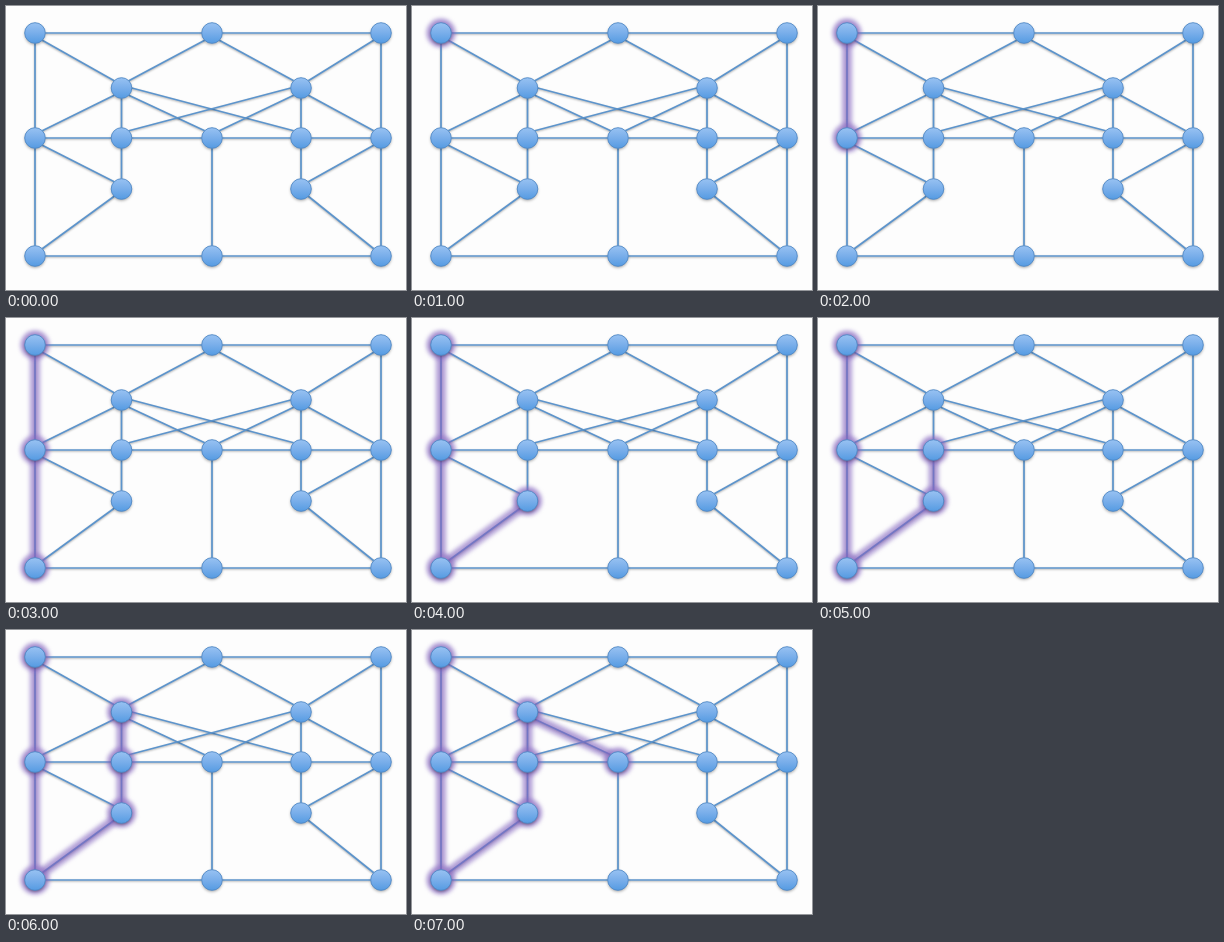
An HTML page with a canvas for the animation above (8000 ms loop, 400x284 px).

```html
<!DOCTYPE html>
<html lang="en">
<head>
<meta charset="utf-8">
<title>Graph path</title>
<style>
html, body { margin: 0; width: 100%; height: 100%; overflow: hidden; background: #fdfdfd; }
canvas { display: block; }
</style>
</head>
<body>
<canvas width="400" height="284"></canvas>
<script>
const ctx = document.querySelector('canvas').getContext('2d');
const RADIUS = 10.3, STEP = 1000, STEPS = 8;

const nodes = {
  A: [29, 27], B: [206, 27], C: [375, 27],
  D: [115.5, 82], E: [295, 82],
  F: [29, 132], G: [115.5, 132], H: [206, 132], I: [295, 132], J: [375, 132],
  K: [115.5, 183], L: [295, 183],
  M: [29, 250], N: [206, 250], O: [375, 250]
};
const edges = ('AB BC AF FM CJ JO MN NO AD DB BE EC DF DG DH DI EG EH EI EJ ' +
  'FG GH HI IJ FK GK KM IL LJ LO HN').split(' ');
const path = 'AFMKGDH';

// Edges attach to the rim of a node, at one of eight compass points.
function endpoints([from, to]) {
  const [x1, y1] = nodes[from], [x2, y2] = nodes[to];
  const sx = Math.sign(x2 - x1), sy = Math.sign(y2 - y1);
  const r = sx && sy ? RADIUS * Math.SQRT1_2 : RADIUS;
  const flat = Math.abs(x2 - x1) > 3 * Math.abs(y2 - y1) && sy;
  return [
    flat ? x1 + sx * RADIUS : x1 + sx * r, flat ? y1 : y1 + sy * r,
    x2 - sx * r, y2 - sy * r
  ];
}

function strokeEdge(edge) {
  const [x1, y1, x2, y2] = endpoints(edge);
  ctx.beginPath();
  ctx.moveTo(x1, y1);
  ctx.lineTo(x2, y2);
  ctx.stroke();
}

function circle([x, y], radius) {
  ctx.beginPath();
  ctx.arc(x, y, radius, 0, 2 * Math.PI);
}

function setShadow(alpha, blur, offset) {
  ctx.shadowColor = `rgba(0, 0, 0, ${alpha})`;
  ctx.shadowBlur = blur;
  ctx.shadowOffsetY = offset;
}

function drawGlow(visited) {
  ctx.save();
  ctx.filter = 'blur(2px)';
  ctx.lineWidth = 10;
  ctx.strokeStyle = 'rgba(132, 100, 190, 0.62)';
  for (let i = 1; i < visited.length; i++) strokeEdge(visited[i - 1] + visited[i]);
  ctx.fillStyle = 'rgba(132, 100, 190, 0.72)';
  for (const name of visited) {
    circle(nodes[name], RADIUS + 4);
    ctx.fill();
  }
  ctx.restore();
}

function drawNode([x, y]) {
  const fill = ctx.createLinearGradient(0, y - RADIUS, 0, y + RADIUS);
  fill.addColorStop(0, '#98c2f2');
  fill.addColorStop(0.5, '#79aeea');
  fill.addColorStop(1, '#559be2');
  circle([x, y], RADIUS);
  ctx.save();
  setShadow(0.35, 3, 1.5);
  ctx.fillStyle = fill;
  ctx.fill();
  ctx.restore();
  ctx.lineWidth = 0.9;
  ctx.strokeStyle = '#5089c8';
  ctx.stroke();
}

function draw(count) {
  ctx.fillStyle = '#fdfdfd';
  ctx.fillRect(0, 0, 400, 284);
  ctx.save();
  setShadow(0.3, 2, 1);
  ctx.lineWidth = 1.7;
  ctx.strokeStyle = '#5c94cc';
  edges.forEach(strokeEdge);
  ctx.restore();
  drawGlow(path.slice(0, count));
  Object.values(nodes).forEach(drawNode);
}

function tick() {
  draw(Math.floor(performance.now() / STEP) % STEPS);
  requestAnimationFrame(tick);
}
tick();
</script>
</body>
</html>
```
